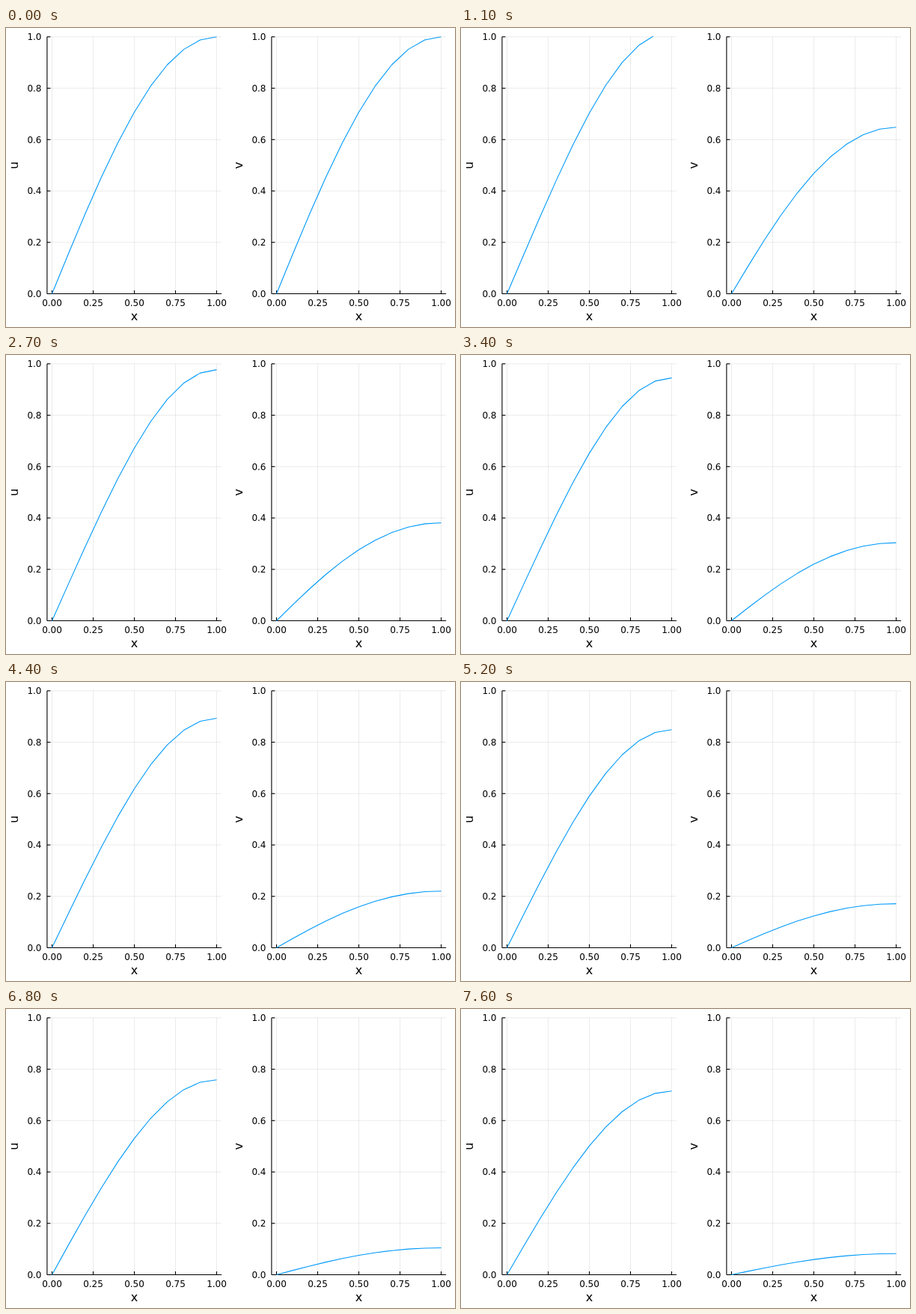
An HTML page that plays this animation: 600x400 px, repeating every 7700 ms.

```html
<!DOCTYPE html>
<html lang="en">
<head>
<meta charset="utf-8">
<title>Coupled diffusion</title>
<style>
  html, body { margin: 0; width: 100%; height: 100%; overflow: hidden; background: #fff; }
  svg { display: block; width: 600px; height: 400px; }
  text { font-family: "DejaVu Sans", Verdana, sans-serif; font-size: 12px; fill: #000; }
  .label { font-size: 16px; }
  .grid { stroke: #000; stroke-opacity: .1; stroke-width: .8; }
  .axis { stroke: #000; stroke-width: 1.1; }
  .curve { fill: none; stroke: #009afa; stroke-width: 1.1; stroke-linejoin: round; }
</style>
</head>
<body>
<svg id="stage" viewBox="0 0 600 400">
  <clipPath id="box"><rect x="54" y="11.3" width="235" height="344.7"/></clipPath>
</svg>
<script>
const STEPS = 77, STEP_MS = 100;
const CELLS = 10, DIFF_U = 0.262, DIFF_V = 0.7;
const LEFT = 54.9, RIGHT = 288.1, TOP = 11.8, BOTTOM = 355.5;
const px = x => 61.5 + 220 * x;
const py = y => BOTTOM - (BOTTOM - TOP) * y;

function add(parent, tag, attrs, content) {
  const el = document.createElementNS("http://www.w3.org/2000/svg", tag);
  for (const key in attrs) el.setAttribute(key, attrs[key]);
  if (content) el.textContent = content;
  parent.appendChild(el);
  return el;
}

function line(parent, cls, x1, y1, x2, y2) {
  add(parent, "line", { class: cls, x1, y1, x2, y2 });
}

function makePanel(offset, name) {
  const g = add(document.getElementById("stage"), "g", { transform: `translate(${offset} 0)` });
  const xTicks = [0, 0.25, 0.5, 0.75, 1], yTicks = [0, 0.2, 0.4, 0.6, 0.8, 1];
  for (const x of xTicks) line(g, "grid", px(x), TOP, px(x), BOTTOM);
  for (const y of yTicks) line(g, "grid", LEFT, py(y), RIGHT, py(y));

  line(g, "axis", LEFT, BOTTOM, RIGHT, BOTTOM);
  line(g, "axis", LEFT, TOP, LEFT, BOTTOM);
  for (const x of xTicks) {
    line(g, "axis", px(x), BOTTOM, px(x), BOTTOM - 4.5);
    add(g, "text", { x: px(x), y: 371.5, "text-anchor": "middle" }, x.toFixed(2));
  }
  for (const y of yTicks) {
    line(g, "axis", LEFT, py(y), LEFT + 4.5, py(y));
    add(g, "text", { x: 47.5, y: py(y) + 4.4, "text-anchor": "end" }, y.toFixed(1));
  }
  add(g, "text", { class: "label", x: 171.5, y: 391.3, "text-anchor": "middle" }, "x");
  add(g, "text", { class: "label", transform: "translate(16 183.7) rotate(-90)", "text-anchor": "middle" }, name);
  return add(g, "polyline", { class: "curve", "clip-path": "url(#box)" });
}

// Solver time reached at each step: the first few steps are longer.
const EXTRA = 0.0228;
const timeAt = n => n * (1 - EXTRA) / (STEPS - 1) + EXTRA * (1 - Math.exp(-n / 3));

// u' = Du u_xx + uv,  v' = Dv v_xx - uv;  zero at x = 0, flat at x = 1
function solve() {
  const start = () => Array.from({ length: CELLS + 1 }, (_, i) => Math.sin(Math.PI * i / CELLS / 2));
  const bend = (a, i) => (a[i - 1] - 2 * a[i] + a[i + 1]) * CELLS * CELLS;
  const flatten = a => { a[CELLS] = (4 * a[CELLS - 1] - a[CELLS - 2]) / 3; };
  let u = start(), v = start(), t = 0;
  const states = [];
  for (let n = 0; n < STEPS; n++) {
    const span = timeAt(n) - t;
    const parts = Math.ceil(span * 10000);
    const dt = parts ? span / parts : 0;
    for (let k = 0; k < parts; k++) {
      const nu = u.slice(), nv = v.slice();
      for (let i = 1; i < CELLS; i++) {
        const mix = u[i] * v[i];
        nu[i] += dt * (DIFF_U * bend(u, i) + mix);
        nv[i] += dt * (DIFF_V * bend(v, i) - mix);
      }
      flatten(nu);
      flatten(nv);
      u = nu;
      v = nv;
    }
    t = timeAt(n);
    states.push({ u, v });
  }
  return states;
}

const states = solve();
const curves = { u: makePanel(0, "u"), v: makePanel(300, "v") };
const toPoints = a => a.map((y, i) => px(i / CELLS).toFixed(2) + "," + py(y).toFixed(2)).join(" ");

let shown = -1;
function draw(n) {
  if (n === shown) return;
  shown = n;
  for (const key in curves) curves[key].setAttribute("points", toPoints(states[n][key]));
}

const began = performance.now();
function tick() {
  draw(Math.floor((performance.now() - began) / STEP_MS) % STEPS);
  requestAnimationFrame(tick);
}
draw(0);
requestAnimationFrame(tick);
</script>
</body>
</html>
```
